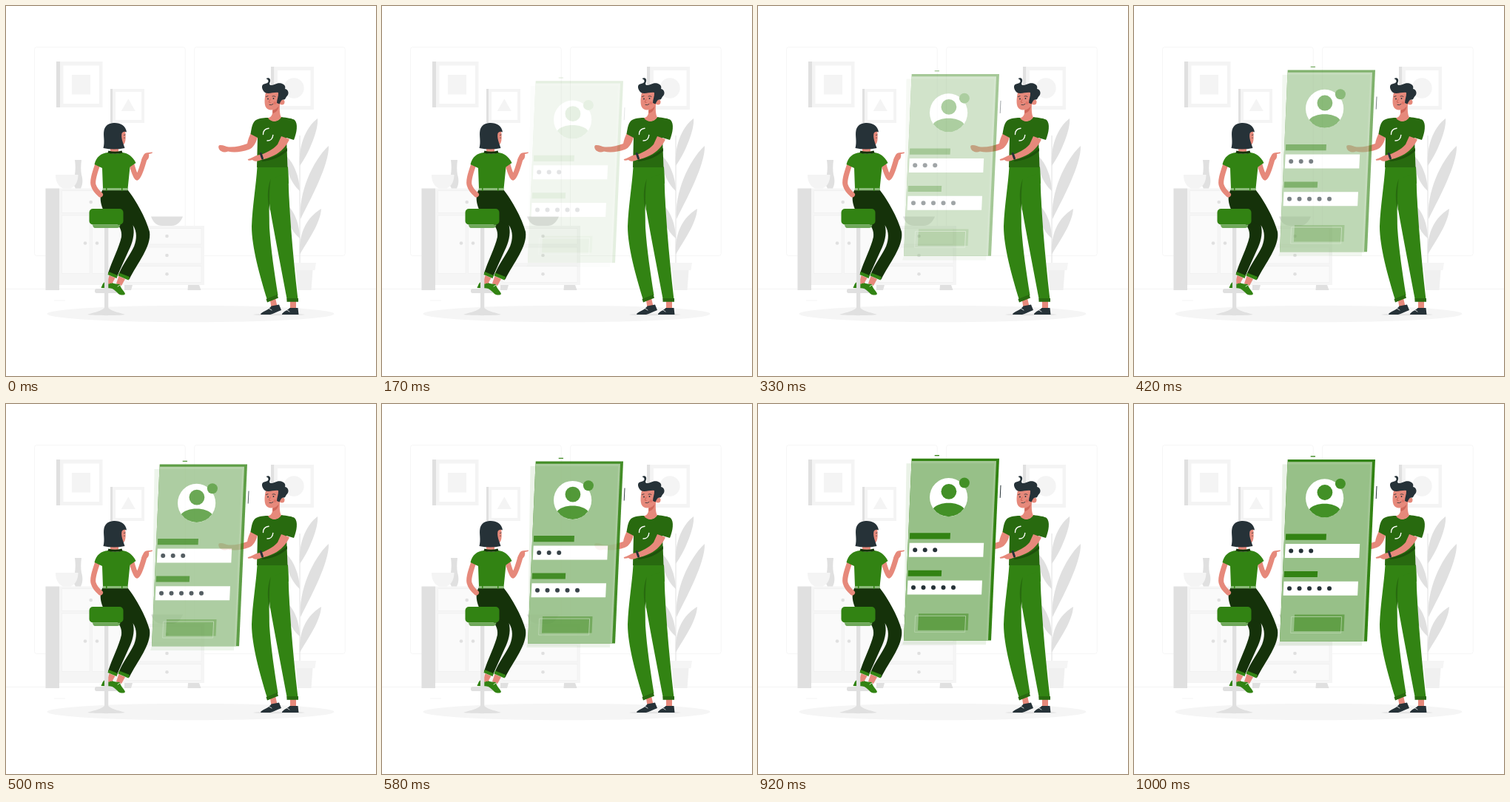
An HTML page for the animation above (1.04 s loop, 500 by 500 pixels).

```html
<!DOCTYPE html>
<html lang="en">
<head>
<meta charset="utf-8">
<title>Sign-in panel</title>
<style>
  html, body { margin: 0; width: 100%; height: 100%; overflow: hidden; background: #fff; }
  svg { display: block; width: 100vw; height: 100vh; }
  .a { fill: #f5f5f5 } .b { fill: #f4f4f4 } .c { fill: #e0e0e0 } .w { fill: #fff }
  .green { fill: #328313 } .deep { fill: #286a0f } .night { fill: #15320a }
  .ink { fill: #263238 } .skin { fill: #e6897b }
  .arm { fill: none; stroke: #e6897b; stroke-linecap: round; stroke-linejoin: round }
  .line { fill: none; stroke: #f0f0f0 }
  .thin { fill: none; stroke-width: .8; stroke-linecap: round }
</style>
</head>
<body>
<svg viewBox="0 0 500 500">
  <g id="room">
    <g class="line" stroke-width=".7">
      <rect x="38.5" y="55.5" width="203.7" height="282" rx="3" stroke="#f3f3f3"/>
      <rect x="254.5" y="55.5" width="203.7" height="282" rx="3" stroke="#f3f3f3"/>
      <path d="M0 382.4H500M65 398H80"/>
    </g>

    <path class="c" d="M68 75h5v62h-5zM141 112h3.500v46h-3.500zM358 82h4.500v58h-4.500z"/>
    <path class="b" d="M73 75h57.500v62H73zM144 112h43v46h-43zM362.500 82H416v58h-53.500z"/>
    <path class="w" d="M77.500 80.500H126V132H77.500zM148 116h35v38h-35zM367 87h44.500v48H367z"/>
    <path class="b" d="M89 93h25v26.500H89zM165.300 125.500l9.500 16.500h-19z"/>
    <circle class="b" cx="389" cy="111" r="13.7"/>

    <path class="a" d="M160 297H268V377H160zM72 246.500H160V377H72z"/>
    <path class="c" d="M53.500 246.500H72V384H53.500zM246 377h15l2.500 7h-18zM160 377h11l-2 7h-9z"/>
    <g fill="#fafafa" stroke="#f0f0f0" stroke-width=".8">
      <path d="M75.500 249.500H155V279.500H75.500zM75.500 283H113V361.500H75.500zM116.500 283H155V361.500H116.500z"/>
      <path d="M163 300.500H264V322H163zM163 326H264V348H163zM163 351.500H264V373.500H163z"/>
    </g>
    <g class="c" id="knobs"></g>
    <path class="c" d="M93 208h9c-1 8-1 14 0 20 2 6 2 13-1 18.500h-7c-4-6-2-12-1-18.500 1-7 1-13 0-20z"/>
    <path class="b" d="M67 228h30.500c0 9-4 16-10 18.500H77C70.500 244 67 237 67 228z"/>
    <path class="c" d="M196 284.500h43c-3 8-9 12.500-15 12.500h-13c-7 0-12-4-15-12.500z"/>

    <path class="c" d="M397 216C395 189 405 164 421 152C423 166 409 200 397 216zM398 288C395 254 414 209 436 189C437 214 412 260 398 288zM397 336C395 304 409 284 426 274C425 294 407 318 397 336zM397 250C397 232 389 212 379 203C378 223 385 239 397 250zM397 314C397 294 389 276 379 268C378 288 385 304 397 314z"/>
    <path d="M397 175V348" stroke="#e0e0e0"/>
    <path class="a" d="M389 347h30l-1.500 10h-27z"/>
    <path fill="#f0f0f0" d="M392 357h22.500l-2 27h-18.500z"/>
    <ellipse class="a" cx="249.500" cy="416" rx="194" ry="11.3"/>
    <ellipse cx="369" cy="417" rx="35" ry="1.3" fill="#e4e4e4"/>
  </g>

  <g id="man">
    <path class="skin" d="M332 170L340 177C338 185 334 192 328 194C319 197 309 198.500 300 196.500C295 198.500 290 197 288 193.500C286.500 190 287 188 290 188C294 188 297 190 301 190.500C310 191 318 189 326 186C327 180 329 175 332 170z"/>

    <path class="skin" d="M356.500 395l7-2.500 3 13-8 2zM384 398h8v12h-8z"/>
    <path class="green" d="M350 218H381C382 270 387 330 394.500 397L380 398C373 360 364 315 357 275z"/>
    <path class="green" d="M339.500 217.500H381L382 240L358 234C354 250 356 270 356 300C358 330 363 362 367.500 391L353 397C343 365 332 325 332 298C333 270 338 242 339.500 217.500z"/>
    <path class="green" d="M358 234L381 225L383 288L361 288C356 270 355 250 358 234z"/>
    <path class="deep" d="M357.500 234C352.500 248 353 262 356.500 277C355.500 260 356 247 357.500 234z"/>
    <path class="deep" d="M351.500 396l15-6 1.500 4.500-15 6zM379.500 395h15.500v4.700h-15.500z"/>
    <path class="ink" d="M344 416C350 411 355 411 358.500 405.500L369 403.500L372 411C366 413 361 416 357 417H344.500zM373 416C376 412 381 411 383.500 408H394.500L395.500 417H373z"/>
    <path class="thin" stroke="#fff" d="M355 408.500l4 2.500M379 410.500l4 2.500"/>

    <path class="deep" d="M338 154C344 151 350 151 355 151C361 158 368 156 372 150C380 151 387 152 390 154C395 159 393 171 389 181L379 178L380.500 218H339L340 178L330.500 173C332 164 333 157 338 154z"/>
    <path fill="#1d510b" d="M346 208C359 206 371 200 379.800 192L380 196C371 204 359 209 346 210z"/>
    <g class="thin" stroke="#fff" style="stroke-width:1.4">
      <path d="M347.500 173.500C347.500 169 350 166 355 165.300M360.800 174.500C360.500 179 357.500 182 353 182"/>
    </g>
    <path class="skin" d="M372 176L383 180C380 188 371 198 362 202C356 205 350 207 344 208L341 202C351 199 361 194 367 187z"/>
    <path class="skin" d="M344 201C338 201 334 205 327 207C326 209 329 209 333 208C336 211 342 210 346 207z"/>
    <path d="M344.300 199.500l2.200 6.500" stroke="#263238" stroke-width="3" stroke-linecap="round"/>

    <path class="skin" d="M360 138L370 133C369.500 141 370 147 372 150.500C368 157 359 158 354 151.500C359 150 361 146 360 138z"/>
    <path fill="#d0675a" d="M360.200 141C364 140 367 138 368.500 135C368.500 140 365 144 360.500 145z"/>
    <path class="skin" d="M351.500 115C349.500 122 348.800 131 350.500 135.500C353 142 362 142 367 136.500L371 132L371 115z"/>
    <ellipse class="skin" cx="373" cy="129.800" rx="3.500" ry="3.600"/>
    <path class="ink" d="M350 117C345.500 113 344.500 107 348.500 105.500C352 104.500 355 104 354.500 101C354 99 352.500 99 351.500 98C355 96 358 98.500 357 102C356.500 104 355 106 357.500 107C363 107 366 103 372 104.500C377 106 378 109 377 112C382 113 383 119 379.500 122C377.500 124 378 127 374.500 126.500C371.500 127 371 130 369.500 132.500L366 131C366 126 368.500 122 368 117C362 116 355 119.500 350 117z"/>
    <g class="ink"><circle cx="354" cy="125.500" r=".9"/><circle cx="361.500" cy="125" r=".9"/></g>
    <path class="thin" stroke="#263238" d="M351.500 122.500l2.500-.8M360 122q2-1 4 .3M356 133.500q3 1 5-1"/>
    <path class="thin" stroke="#c8594c" d="M357 126l-1.800 4 2 .5"/>
    <circle cx="363.500" cy="131" r="2" fill="#e07568"/>
  </g>

  <g id="panel" opacity="0">
    <path class="green" d="M207.700 75H326L315 320.800H197z"/>
    <path fill="#a3c795" d="M207.500 78.200H322L311 320.800H197z"/>
    <path fill="#328313" fill-opacity=".1" d="M200.500 81.500H319L308 326.500H195L197 320.800z"/>
    <path d="M238.700 70.800H245" stroke="#328313" stroke-width="1.300"/>
    <path d="M328 111L327.200 128" stroke="#263238" stroke-width="1"/>
    <ellipse class="w" cx="257.600" cy="127.300" rx="25.600" ry="26"/>
    <g fill="#429026">
      <circle cx="257.900" cy="119.500" r="10.400"/>
      <path d="M236.800 142.500C244 132.300 271 132.300 278.400 142.500A25.600 26 0 0 1 236.800 142.500z"/>
      <circle cx="278.900" cy="107.700" r="7"/>
    </g>
    <path class="green" d="M205.200 175.500H260L259.600 183.700H204.800zM203 226H248.200L247.800 234H202.600z"/>
    <path class="w" d="M204.700 189H305.200L304.300 208H203.800zM202.500 239.700H303L302.100 258.700H201.600z"/>
    <g class="ink" id="dots"></g>
    <path fill="#68a34f" d="M217 284.500H284.500L283.500 307H216z"/>
    <path fill="#328313" fill-opacity=".12" d="M217 288H280.500L279.600 307H216z"/>
    <path class="thin" stroke="#b9d6ae" d="M213 287.500H280.600L279.600 309.500H212z"/>
  </g>

  <g id="woman">
    <path class="green" d="M128.500 381C130 377 131 374 134 372.500C136 376 140 376 143 373.500L147 376L143 381.500z"/>
    <path class="skin" d="M139.500 364l8 3.500-5 9-6-2z"/>
    <path class="c" d="M133 300h5.300v108C143 413 156 415 161 417C152 418.500 119 418.500 110 417C115 415 128 413 133 408z"/>
    <rect class="c" x="120" y="382" width="31" height="6" rx="2.500"/>
    <path class="skin" d="M152.500 365l8.500 4-5 9-7-3z"/>
    <path class="green" d="M140 375C144 374 150 376 154 376C154 381 160 385 161 389C160 391 155 391 152 389C148 385 144 381 140 381z"/>
    <path class="thin" stroke="#fff" d="M151 379l3-2"/>

    <path class="night" d="M146 275L166 282L172 298C174 309 171 320 165.500 331C160 343 154 356 149.500 367L138 361C143 345 153 326 156 312C157 303 153 297 148 292z"/>
    <path class="night" d="M130.500 248.500H164.500C175 262 189 286 194 305C197 325 177 348 166.500 369.500L152 363.500C157 350 167 338 173 325C177 315 177 305 172 297L157 290H140C132 279 123 262 130.500 248.500z"/>
    <path class="green" d="M138.800 359l12 5-1.300 4-12-5zM153 360.500l14 5.500-1.500 4.500-14-6z"/>
    <rect class="green" x="112.500" y="274" width="46" height="21.500" rx="5"/>
    <path fill="#6fa85a" d="M117 295.500H154.500C154 298 153 300 150 300H121C118 300 117.500 298 117 295.500z"/>

    <path class="arm" stroke-width="7" d="M123.500 215C119 228 116 238 118.500 243C120 248 124 252 127.500 255"/>
    <path class="arm" stroke-width="7" d="M169 211C172 222 174 229 177 232C181 229 184 217 187 207"/>
    <path class="skin" d="M183.500 208C185 201 188 198 191 198.200L197.500 197.600C199 198.500 197 199.500 193 200C194 204 192 208 189 209z"/>
    <path class="green" d="M138 198C145 200 151 200 157 198C165 199 171 203 175.500 212L167.500 217.500L164.500 247H131L130 219L119.500 214C122 204 128 199 138 198z"/>
    <path fill="#8aba78" d="M130.800 246h34v3.300h-34z"/>
    <path class="green" d="M135 245.500h1.500v4.300H135zM156 245.500h1.500v4.300H156z"/>
    <path class="skin" d="M141 188h11v9h-11z"/>
    <path class="night" d="M138.500 195.500Q147 198 156.500 195.500L157.500 198.500Q147 201 137.500 198.500z"/>
    <path class="skin" d="M150 167H161C161.500 174 162.500 181 160 186C158 188.500 153 188 151 186z"/>
    <path class="thin" stroke="#263238" d="M159.500 174.500l1.500-.5M160 178v.5"/>
    <path class="ink" d="M131.500 192C134 183 131 175 132.500 168C134 161 140 157.500 147 158C155 158 162 162 163 170.500C160.500 169 158 170 156.500 172C155 179 158.500 185 160.500 192Q146 195 131.500 192z"/>
  </g>
</svg>
<script>
  const LOOP = 1040, FPS = 24, DURATION = 1000, LEAD = 20, RISE = 30;
  const panel = document.getElementById("panel");

  const addCircles = (id, radius, points) => {
    document.getElementById(id).innerHTML = points
      .map(([x, y]) => `<circle cx="${x}" cy="${y}" r="${radius}"/>`).join("");
  };
  const row = (count, x, y) => Array.from({ length: count }, (_, i) => [x + 13.5 * i, y]);

  addCircles("knobs", 2.3, [[114.7, 265], [107, 320.5], [123, 320.5], [217.5, 311], [217.5, 337], [217.5, 362.3]]);
  addCircles("dots", 3, [...row(3, 212.2, 198.4), ...row(5, 210, 249.2)]);

  const bezier = (a, b, s) => 3 * (1 - s) * s * ((1 - s) * a + s * b) + s ** 3;

  // Eases out past the resting place, then settles.
  function ease(x) {
    if (x >= 1) return 1;
    let low = 0, high = 1;
    for (let i = 0; i < 24; i++) {
      const mid = (low + high) / 2;
      if (bezier(0.36, 0.5, mid) < x) low = mid; else high = mid;
    }
    return bezier(-0.01, 1.38, low);
  }

  function render(time) {
    const step = Math.floor((time % LOOP + 4) * FPS / 1000);
    const progress = step < 2 ? 0 : ease((step * 1000 / FPS + LEAD) / DURATION);
    panel.setAttribute("opacity", Math.min(progress, 1));
    panel.setAttribute("transform", `translate(0 ${RISE * (1 - progress)})`);
  }

  const start = performance.now();
  function tick() {
    render(performance.now() - start);
    requestAnimationFrame(tick);
  }
  tick();
</script>
</body>
</html>
```
